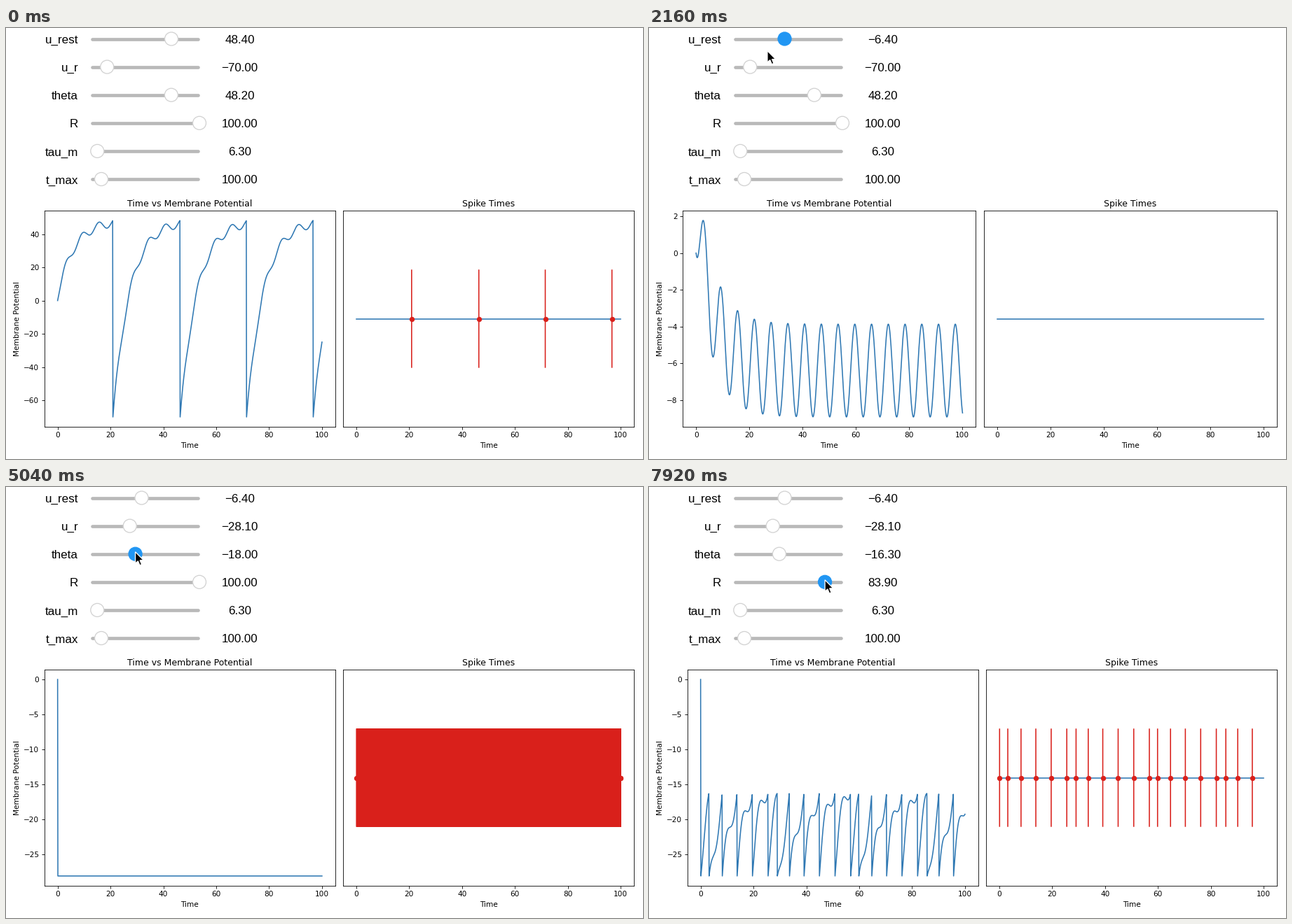
Recreate the animation shown at these times as a matplotlib script. Size 909 by 616 pixels, loop 8000 ms.

```python
import math

import matplotlib.pyplot as plt
import numpy as np
from matplotlib.animation import FuncAnimation
from matplotlib.patches import Circle, Polygon

W, H, DPI = 909, 616, 64
PX = 72 / DPI            # points per pixel
S = 1.047 * PX           # scale of the plot's fonts and strokes
FRAME_MS, LOOP_MS, STEP_FRAMES = 40, 8000, 3

BLUE, RED, ACCENT = "#2f78b3", "#d9201b", "#2196f3"
TRACK, RIM = "#b9b9b9", "#d2d2d2"

style = {"font.family": "DejaVu Sans", "font.size": 10 * S,
         "axes.titlesize": 12 * S, "axes.titlepad": 6 * S,
         "axes.labelpad": 4 * S, "axes.linewidth": 0.8 * S}
for axis in ("xtick", "ytick"):
    style.update({f"{axis}.major.size": 3.5 * S, f"{axis}.major.pad": 3.5 * S,
                  f"{axis}.major.width": 0.8 * S})
plt.rcParams.update(style)

# name: (first value, low end, high end)
SLIDERS = {
    "u_rest": (48.4, -100, 100),
    "u_r": (-70, -100, 100),
    "theta": (48.2, -100, 100),
    "R": (100, 0, 100),
    "tau_m": (6.3, 0, 105),
    "t_max": (100, 0, 1030),
}
ROWS = list(SLIDERS)

# name, press, release, value dragged to; a step lasts 120 ms
DRAGS = [
    ("u_rest", 4.27, 14.59, -6.4),
    ("u_r", 20, 25, -28.1),
    ("theta", 31.64, 37, -29.2),
    ("theta", 40, 43, -16.3),
    ("R", 60, 66, 83.9),
]
LAG = 2                  # the plots trail the sliders by this many steps
TRAVEL = 4               # steps the pointer takes between two stops
HOVER = (55, 57, (288, 135))


# ---- motion ----
def value(name, step):
    v = SLIDERS[name][0]
    for drag, press, release, end in DRAGS:
        if drag == name and step >= press:
            t = min((step - press) / (release - press), 1)
            v += (end - v) * math.sin(math.pi / 2 * t)
    return round(v, 1)


def row_y(name):
    return 15.5 + 40.1 * ROWS.index(name)


def knob_x(name, step):
    _, lo, hi = SLIDERS[name]
    return 121 + 155 * (value(name, step) - lo) / (hi - lo)


def hand_on(name, step):
    return np.array([knob_x(name, step), row_y(name) - 3])


STOPS = [(press, release, hand_on(name, press), hand_on(name, release))
         for name, press, release, _ in DRAGS]
STOPS.append((*HOVER[:2], np.array(HOVER[2]), np.array(HOVER[2])))
STOPS.sort(key=lambda stop: stop[0])


def pointer_at(step):
    for name, press, release, _ in DRAGS:
        if press <= step <= release:
            return hand_on(name, step)
    here = STOPS[0][2]
    for start, end, first, last in STOPS:
        if step >= end:
            here = last
        elif step < start:
            t = np.clip(1 - (start - step) / TRAVEL, 0, 1)
            return here + (first - here) * t * t * (3 - 2 * t)
    return here


def active_at(step):
    pressed = [name for name, press, _, _ in DRAGS if step >= press]
    return pressed[-1] if pressed else None


# ---- leaky integrate-and-fire neuron driven by a sine current ----
TIME = np.linspace(0, 100, 1000)
DT = TIME[1]


def simulate(rest, reset, theta, resist, tau):
    u, trace, spikes = 0.0, [0.0], []
    for before, now in zip(TIME, TIME[1:]):
        u += DT / tau * (rest - u + resist * 0.16 * math.sin(before))
        if u >= theta:
            u = reset
            spikes.append(now)
        trace.append(u)
    return np.array(trace), np.array(spikes)


runs = {}


def run_at(step):
    args = tuple(value(name, step - LAG) for name in ROWS[:5])
    if args not in runs:
        runs[args] = simulate(*args)
    return runs[args]


# ---- stage ----
fig = plt.figure(figsize=(W / DPI, H / DPI), dpi=DPI, facecolor="white")
ui = fig.add_axes([0, 0, 1, 1])
ui.set(xlim=(0, W), ylim=(H, 0))
ui.axis("off")

TOP, BOTTOM, RIGHT, GAP = 261, 570, 896, 11.3
EM = 10.47


def add_plot(title):
    ax = fig.add_axes([0, 0, 0.5, (BOTTOM - TOP) / H], label=title)
    ax.set(title=title, xlabel="Time", xlim=(-5, 105), facecolor="none")
    return ax


def place(ax, left, width):
    ax.set_position([left / W, 1 - BOTTOM / H, width / W, (BOTTOM - TOP) / H])


volt = add_plot("Time vs Membrane Potential")
raster = add_plot("Spike Times")
raster.set(ylim=(-1.1, 1.1), yticks=[])
ui.text(21, (TOP + BOTTOM) / 2, "Membrane Potential", rotation=90,
        ha="right", va="center")

trace_line, = volt.plot([], [], color=BLUE, lw=1.5 * S)
raster.plot([0, 100], [0, 0], color=BLUE, lw=1.5 * S)
stems, = raster.plot([], [], color=RED, lw=1.5 * S, solid_capstyle="butt",
                     snap=False)
dots, = raster.plot([], [], "o", color=RED, ms=6 * S, mew=S, snap=False)

knobs, readouts = {}, {}
for name in ROWS:
    y = row_y(name)
    font = dict(family="Liberation Sans", size=17 * PX, va="baseline")
    ui.text(103, y + 6.5, name, ha="right", **font)
    ui.plot([123, 274], [y, y], color=TRACK, lw=4.7 * PX,
            solid_capstyle="round", zorder=2)
    knobs[name] = ui.add_patch(Circle((0, y), 9.5, lw=1.3 * PX, zorder=3))
    readouts[name] = ui.text(333.5, y + 6.5, "", ha="center", **font)

ARROW = np.array([(0, 0), (0, 16.6), (3.8, 13.1), (6.4, 19.2),
                  (9.1, 18), (6.6, 12.1), (11.8, 12)])
pointer = ui.add_patch(Polygon(ARROW, fc="black", ec="white", lw=1.3 * PX,
                               joinstyle="miter", zorder=5))


def update_sliders(step):
    active = active_at(step)
    for name in ROWS:
        knobs[name].center = (knob_x(name, step), row_y(name))
        knobs[name].set_facecolor(ACCENT if name == active else "white")
        knobs[name].set_edgecolor(ACCENT if name == active else RIM)
        readouts[name].set_text(f"{value(name, step):.2f}".replace("-", "\u2212"))
    pointer.set_visible(step > 0)
    pointer.set_xy(ARROW + pointer_at(step))


def label_width(text):
    glyphs = {"\u2212": 0.838, ".": 0.318}
    return EM * sum(glyphs.get(c, 0.636) for c in text)


def update_plots(step):
    u, spikes = run_at(step)
    trace_line.set_data(TIME, u)
    margin = 0.05 * (u.max() - u.min())
    lo, hi = u.min() - margin, u.max() + margin
    volt.set_ylim(lo, hi)

    # the widest tick label decides where the left plot begins
    ticks = [t for t in volt.get_yticks() if lo <= t <= hi]
    labels = volt.yaxis.get_major_formatter().format_ticks(ticks)
    left = 32.7 + max(map(label_width, labels))
    width = (RIGHT - GAP - left) / 2
    place(volt, left, width)
    place(raster, RIGHT - width, width)

    stems.set_data(np.repeat(spikes, 3), np.tile([-0.5, 0.5, np.nan], len(spikes)))
    dots.set_data(spikes, np.zeros(len(spikes)))


def update(frame):
    step = frame // STEP_FRAMES
    update_sliders(step)
    update_plots(step)
    return []


anim = FuncAnimation(fig, update, frames=LOOP_MS // FRAME_MS, interval=FRAME_MS,
                     init_func=lambda: update(0), repeat=True, repeat_delay=0,
                     blit=False)
plt.show()
```
